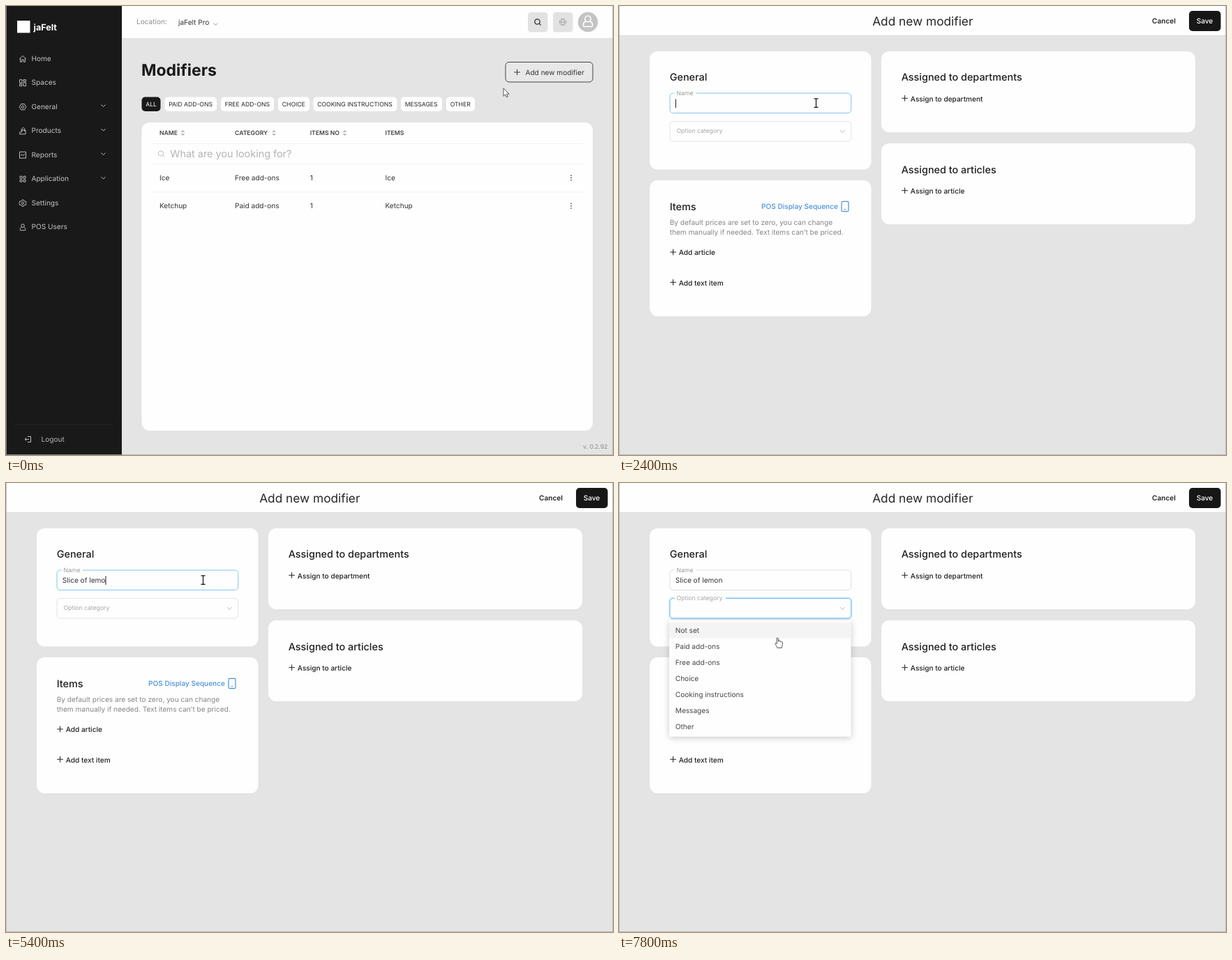
Animation, 870 px wide and 644 px high, one loop 8000 ms. Source, as an HTML page:

```html
<!DOCTYPE html>
<html lang="en">
<head>
<meta charset="utf-8">
<title>Add a modifier</title>
<style>
html, body { margin: 0; width: 100%; height: 100%; overflow: hidden; background: #e4e4e4; }
svg { display: block; width: 870px; height: 644px; }
text { font-family: Inter, sans-serif; font-size: 10.08px; fill: #333; white-space: pre; text-rendering: geometricPrecision; }
.small { font-size: 8.64px; }
.head { font-size: 14.4px; font-weight: 500; fill: #1f1f1f; }
.strong { font-weight: 500; fill: #1f1f1f; }
.line { fill: none; stroke: #bdbdbd; }
.rule { stroke: #f1f1f1; }
.card { fill: #fefefe; }
#menu { filter: drop-shadow(0 2px 5px rgba(0, 0, 0, .2)); }
</style>
</head>
<body>
<svg id="stage" viewBox="0 0 870 644"></svg>
<script>
const text = (x, y, s, attrs = '') => `<text x="${x}" y="${y}" ${attrs}>${s}</text>`;
const box = (x, y, w, h, r, attrs) => `<rect x="${x}" y="${y}" width="${w}" height="${h}" rx="${r}" ${attrs}/>`;
const icon = (x, y, d, attrs = '') => `<path class="line" transform="translate(${x} ${y})" d="${d}" ${attrs}/>`;
const ring = (x, y, r) => `M${x - r} ${y}a${r} ${r} 0 1 0 ${2 * r} 0a${r} ${r} 0 1 0 ${-2 * r} 0`;
const square = (x, y, w, h = w) => `M${x} ${y}h${w}v${h}h${-w}z`;
const rule = (x1, x2, y) => `<path class="rule" d="M${x1} ${y}H${x2}"/>`;
const plus = (x, y, attrs = 'style="stroke:#222"') => icon(x, y, 'M-4.3 0H4.3M0-4.3V4.3', attrs);
const chevron = 'M-3-1.4L0 1.6L3-1.4';
const lens = ring(-.5, -.5, 3.7) + 'M2.2 2.2L4.6 4.6';

// List screen
const menuItems = [
  ['Home', 'M-4.8 .3L0-4.2L4.8 .3M-3.4-.8V4.5H-1.2V1.2H1.2V4.5H3.4V-.8'],
  ['Spaces', square(-4.5, -4.5, 3.5, 4.8) + square(1, -4.5, 3.5, 2.5) + square(-4.5, 2, 3.5, 2.5) + square(1, -.3, 3.5, 4.8)],
  ['General', 'M-2.4-4.2H2.4L4.8 0L2.4 4.2H-2.4L-4.8 0Z' + ring(0, 0, 1.8)],
  ['Products', 'M-3-1.2H4V4.6H-4.5L-4 1.5H-1M-1.2 1V-2.5C-1-5.4 2.4-5.4 2.5-2.5V.5'],
  ['Reports', square(-4.5, -4.5, 9) + 'M-3 1.2L-1-1L.8 1L3-1.8'],
  ['Application', [[-4, -4], [1, -4], [-4, 1], [1, 1]].map(p => square(...p, 3)).join('')],
  ['Settings', ring(0, 0, 1.6) + 'M-1-4.6H1L1.5-3.3L3-2.6L4.3-2.7L5-1L4 0L5 1L4.3 2.7L3 2.6L1.5 3.3L1 4.6H-1L-1.5 3.3L-3 2.6L-4.3 2.7L-5 1L-4 0L-5-1L-4.3-2.7L-3-2.6L-1.5-3.3Z'],
  ['POS Users', ring(0, -2, 2.3) + 'M-1.5 0C-4.5 1.2-4 4.5-3.4 4.5H3.4C4 4.5 4.5 1.2 1.5 0']
];
const sidebar = box(0, 0, 166, 644, 0, 'fill="#191919"') +
  box(16, 21, 18.5, 17.5, 0, 'fill="#fff"') +
  text(39.5, 35, 'jaFelt', 'style="font-size:12.6px;font-weight:700;fill:#fff"') +
  menuItems.map(([name, d], i) => {
    const y = 75 + 34.5 * i;
    return icon(24, y + .7, d) + text(36.5, y + 3.6, name, 'style="fill:#c4c4c4"') +
      ([2, 3, 4, 5].includes(i) ? icon(139.5, y - 1, chevron) : '');
  }).join('') +
  '<path d="M12 600.5H154" stroke="#242424"/>' +
  icon(31.5, 621.5, 'M-.5-4H4V4H-.5M1.5 0H-4.5M-2.2-2.2L-4.5 0L-2.2 2.2') +
  text(50.5, 625, 'Logout', 'style="fill:#b5b5b5"');

const topBar = box(166, 0, 704, 46, 0, 'class="card"') +
  text(187, 26.3, 'Location:', 'style="fill:#8c8c8c"') + text(247, 26.8, 'jaFelt Pro') +
  icon(300.5, 26, chevron, 'style="stroke:#999"') +
  box(748, 9, 28.5, 28.5, 4.5, 'fill="#e2e2e2"') + icon(762, 23, lens, 'style="stroke:#222;stroke-width:1.2"') +
  box(784, 9, 28.5, 28.5, 4.5, 'fill="#e2e2e2"') +
  icon(798, 23, ring(0, 0, 4.7) + 'M-4.7 0H4.7M0-4.7C-3-2-3 2 0 4.7C3 2 3-2 0-4.7', 'style="stroke:#999;stroke-width:.8"') +
  '<circle cx="834" cy="23" r="14.3" fill="#c4c4c4"/>' +
  icon(834, 22, ring(0, -3.5, 4.2) + 'M-3-.2C-8 2-7 7.5-5.5 7.5H5.5C7 7.5 8 2 3-.2', 'style="stroke:#fff;stroke-width:1.6"');

const tabs = [['ALL', 194.5, 27], ['PAID ADD-ONS', 227.5, 74.5], ['FREE ADD-ONS', 308, 76], ['CHOICE', 390, 45],
  ['COOKING INSTRUCTIONS', 440.5, 120], ['MESSAGES', 566, 59], ['OTHER', 631, 41]]
  .map(([name, x, w], i) => box(x, 130.5, w, 20.5, 5, `fill="${i ? '#fefefe' : '#191919'}"`) +
    text(x + 5.7, 144, name, `class="small" style="fill:${i ? '#262626' : '#fff'}"`)).join('');

const columns = [220, 328, 435.7, 543.5];
const sorters = [253.5, 384, 485.5];
const table = box(194.5, 167, 646.5, 442, 11.5, 'class="card"') +
  ['NAME', 'CATEGORY', 'ITEMS NO', 'ITEMS'].map((s, i) =>
    text(columns[i], 185, s, 'class="small" style="font-weight:600;fill:#444"')).join('') +
  sorters.map(x => `<path transform="translate(${x} 182)" d="M-3-1L0-4.2L3-1ZM-3 1L0 4.2L3 1Z" fill="#bbb"/>`).join('') +
  rule(209, 827, 197.5) + rule(209, 827, 226.5) + rule(209, 827, 267) +
  icon(222.5, 212, lens) + text(235.3, 217.3, 'What are you looking for?', 'style="font-size:14.4px;fill:#b3b3b3"') +
  [['Ice', 'Free add-ons', '1', 'Ice'], ['Ketchup', 'Paid add-ons', '1', 'Ketchup']].map((row, r) => {
    const y = 246.5 + 40.3 * r;
    return row.map((s, i) => text(columns[i], y + 3.6, s)).join('') +
      [-3.3, 0, 3.3].map(d => `<circle cx="810" cy="${y + d}" r=".9" fill="#555"/>`).join('');
  }).join('');

const listScreen = sidebar + topBar + text(194, 100, 'Modifiers', 'style="font-size:23.04px;font-weight:700;fill:#191919"') +
  box(716, 80.5, 125, 28.5, 5, 'id="addBox" fill="#e8e8e8" stroke="#444"') +
  plus(732.5, 95, 'id="addPlus"') + text(744.5, 98.6, 'Add new modifier', 'id="addText"') +
  tabs + table + text(827, 635.3, 'v. 0.2.92', 'class="small" style="fill:#8c8c8c"');

// Form screen
const blue = '#4a90dc';
const addLink = (x, y, s) => plus(x + 4.3, y - .5) + text(x + 12.5, y + 3.8, s, 'class="strong"');
const formScreen = box(0, 0, 870, 42, 0, 'class="card"') + '<path d="M0 42.5H870" stroke="#dcdcdc"/>' +
  text(435.3, 27.8, 'Add new modifier', 'text-anchor="middle" style="font-size:17.28px;fill:#262626"') +
  text(764, 24.7, 'Cancel', 'style="font-weight:600;fill:#222"') +
  box(817, 7, 45.5, 29, 5, 'fill="#171717"') + text(827.7, 24.8, 'Save', 'style="font-weight:500;fill:#fff"') +
  [[44, 65, 317.5, 169.5], [44, 250, 317.5, 195], [376, 65, 450, 116], [376, 197, 450, 116]]
    .map(r => box(...r, 11.5, 'class="card"')).join('') +
  text(72.7, 107.3, 'General', 'class="head"') +
  text(404.7, 107.3, 'Assigned to departments', 'class="head"') + addLink(405.3, 132.8, 'Assign to department') +
  text(404.7, 239.5, 'Assigned to articles', 'class="head"') + addLink(405.3, 265.2, 'Assign to article') +
  text(72.7, 292.7, 'Items', 'class="head"') +
  text(204, 291.2, 'POS Display Sequence', `style="font-weight:500;fill:${blue}"`) +
  box(319, 280.3, 10, 14.4, 1.8, `fill="none" stroke="${blue}" stroke-width="1.2"`) +
  `<circle cx="324" cy="291.7" r=".9" fill="${blue}"/>` +
  text(72.7, 313.8, 'By default prices are set to zero, you can change', 'style="fill:#858585"') +
  text(72.7, 327.8, 'them manually if needed. Text items can’t be priced.', 'style="fill:#858585"') +
  addLink(73.2, 353.5, 'Add article') + addLink(73.2, 396.8, 'Add text item') +
  box(73, 125, 259.7, 28.5, 4.5, 'id="nameBox" fill="#fefefe"') + box(79.5, 123, 30.5, 4, 0, 'class="card"') +
  text(82.5, 127.5, 'Name', 'class="small" style="fill:#999"') +
  text(80.8, 143.3, '', 'id="name"') + '<path id="caret" d="M0 133.5V146" stroke="#111"/>' +
  box(71.8, 164.3, 262.1, 30.9, 5.5, 'id="glow" fill="none" stroke="#d3ebfb" stroke-width="1.6"') +
  box(73, 165.5, 259.7, 28.5, 4.5, 'id="pickBox" fill="#fefefe"') +
  box(79.5, 163, 73.5, 4.5, 0, 'id="pickGap" class="card"') +
  text(82.5, 182, 'Option category', 'id="pickLabel" class="small" style="fill:#a6a6a6"') +
  icon(320.3, 179.7, 'M-3.5-1.8L0 2L3.5-1.8') +
  '<g id="menu">' + box(72, 197, 260.5, 166.7, 1.5, 'class="card"') + box(72, 200, 260.5, 22.5, 0, 'fill="#f4f4f4"') +
  ['Not set', 'Paid add-ons', 'Free add-ons', 'Choice', 'Cooking instructions', 'Messages', 'Other']
    .map((s, i) => text(80.8, 215.2 + 23 * i, s, 'style="fill:#444"')).join('') + '</g>';

const cursors = {
  arrow: 'M0 0V11.3L2.6 9L4.3 12.8L6.3 12L4.6 8.2H8Z',
  beam: 'M-3-6.2H-.7L0-5.6L.7-6.2H3M0-5.6V5.8M-3 6.3H-.7L0 5.7L.7 6.3H3',
  hand: 'M-1 1C-1-.4 1-.4 1.1 1L1.4 5.4C2-.0 3.4 4.6 3.6 5.8C4 4.6 5.3 4.9 5.5 6.2C6 5.3 7.3 5.5 7.4 7C7.6 10 6.6 11.5 6.2 14.5H0C-.6 12.4-2.4 10.8-3.2 8.6C-3.4 7.2-1.8 6.8-.6 8.6Z'
};
document.getElementById('stage').innerHTML = box(0, 0, 870, 644, 0, 'fill="#e4e4e4"') +
  `<g id="list">${listScreen}</g><g id="form">${formScreen}</g>` +
  '<path d="M.5 0V643.5H869.5V0" fill="none" stroke="#a8a8a8" stroke-opacity=".7"/><path id="cursor"/>';

const el = id => document.getElementById(id);
const show = (id, on) => { el(id).style.display = on ? '' : 'none'; };
const paint = (id, prop, value) => { el(id).style[prop] = value; };

// Linear interpolation over [time, value...] keys
function at(keys, t, k = 1) {
  const i = keys.findIndex(key => key[0] > t);
  if (i < 0) return keys[keys.length - 1][k];
  if (!i) return keys[0][k];
  const a = keys[i - 1], b = keys[i];
  return a[k] + (b[k] - a[k]) * (t - a[0]) / (b[0] - a[0]);
}
const path = [[0, 713, 118], [200, 713, 118], [1000, 720, 104], [1200, 387, 150], [1400, 375, 150], [2400, 282.5, 139],
  [6000, 282.5, 139], [7000, 277, 184], [7400, 277, 184], [7800, 227, 222]];
const typed = [[2400, 0], [2600, 1], [2800, 1], [3800, 7], [4400, 7], [4600, 8], [5600, 14]];

function draw(t) {
  const form = t >= 1200, open = t >= 7400;
  const x = at(path, t), y = at(path, t, 2);
  show('list', !form);
  show('form', form);

  const hover = y < 109;
  paint('addBox', 'stroke', hover ? '#5ba5e4' : '#444');
  paint('addPlus', 'stroke', hover ? '#4a96dc' : '#333');
  paint('addText', 'fill', hover ? '#4a96dc' : '#333');

  const inX = form && x > 73 && x < 333;
  const onName = inX && y < 153.5, onPick = inX && y > 165;
  el('name').textContent = 'Slice of lemon'.slice(0, Math.round(at(typed, t)));
  show('caret', t < 6200);
  if (form) el('caret').setAttribute('transform', `translate(${81.3 + el('name').getComputedTextLength()} 0)`);
  paint('nameBox', 'stroke', open ? '#dedede' : '#82c6ee');
  paint('pickBox', 'stroke', open ? '#69b9ee' : onPick ? '#82c6ee' : '#e3e3e3');
  show('glow', open);
  show('pickGap', open);
  el('pickLabel').setAttribute('y', open ? 167.5 : 182);
  show('menu', t >= 7600);

  const kind = onName ? 'beam' : onPick ? 'hand' : 'arrow';
  const c = el('cursor');
  c.setAttribute('d', cursors[kind]);
  c.setAttribute('transform', `translate(${x} ${y})`);
  c.setAttribute('style', kind === 'beam' ? 'fill:none;stroke:#111;stroke-width:1.2' : 'fill:#fff;stroke:#444;stroke-width:.9');
}

const start = performance.now();
function tick() {
  const t = (performance.now() - start) % 8000;
  draw(Math.floor(t / 200) * 200);
  requestAnimationFrame(tick);
}
tick();
</script>
</body>
</html>
```
